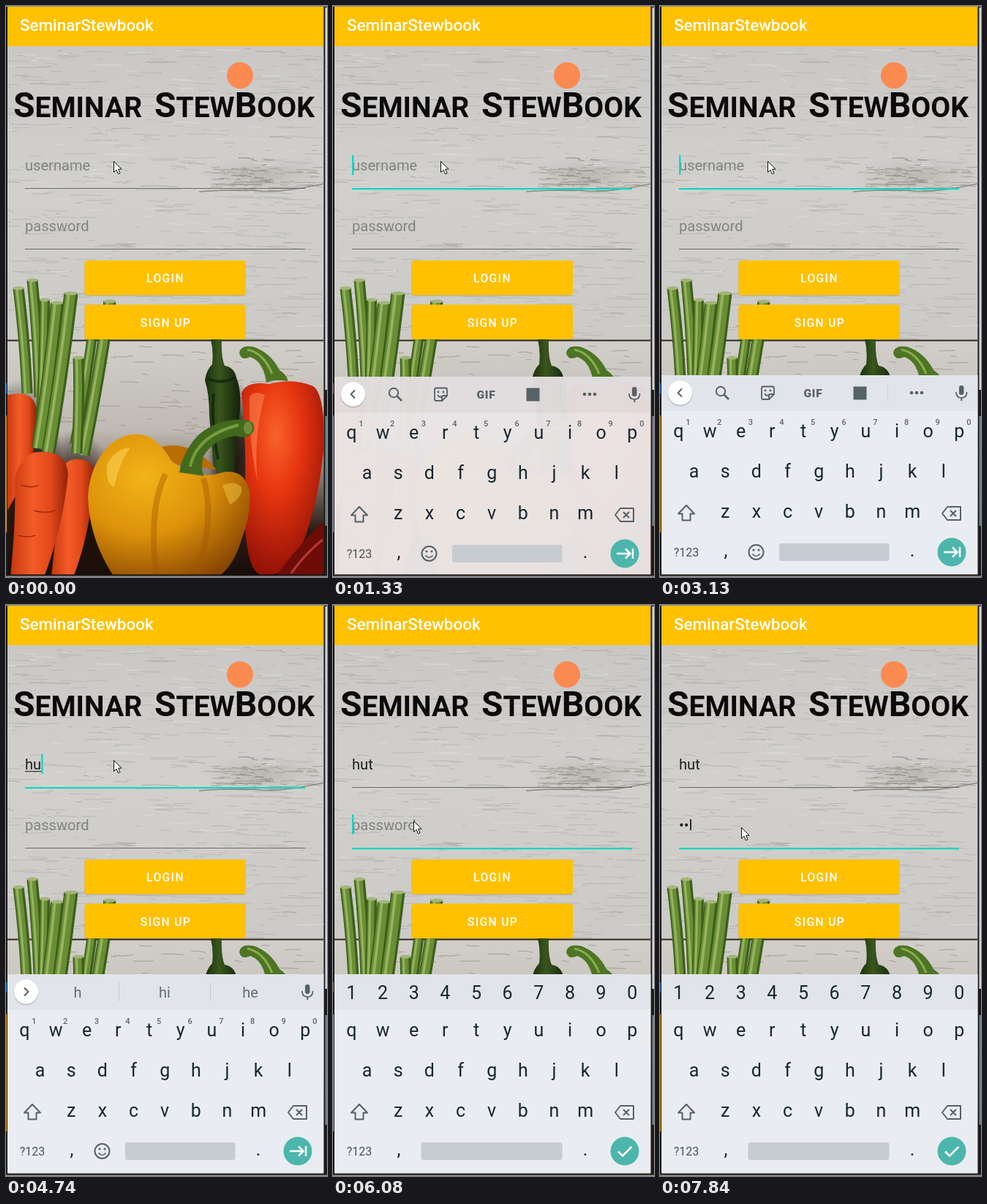
Recreate the animation shown at these times as an HTML page. Size 439 by 781 pixels, loop 7.99 s.

```html
<!DOCTYPE html>
<html lang="en">
<head>
<meta charset="utf-8">
<title>SeminarStewbook</title>
<style>
  html, body { margin: 0; width: 100%; height: 100%; overflow: hidden; background: #1c1c1c; }
  svg { display: block; width: 439px; height: 781px; }
  text { font-family: Roboto, "Open Sans", sans-serif; white-space: pre; }
  .title { font-size: 22.4px; font-weight: 500; fill: #fff; }
  .brand { font-size: 48px; font-weight: 700; fill: #0c0a0a; }
  .brand tspan { font-size: 39px; }
  .input { font-size: 20.1px; fill: #20211f; }
  .hint { font-size: 20.1px; fill: #83847d; }
  .btn { fill: #ffc100; }
  .label { font-size: 15.6px; font-weight: 500; letter-spacing: 1.4px; fill: #fff; text-anchor: middle; }
  .key { font-size: 25px; fill: #17272e; text-anchor: middle; }
  .tiny { font-size: 11px; font-weight: 500; fill: #5b666c; text-anchor: middle; }
  .word { font-size: 20px; fill: #626c72; text-anchor: middle; }
  .mode { font-size: 16px; fill: #475259; text-anchor: middle; }
  .icon { fill: none; stroke: #566168; stroke-width: 2; stroke-linejoin: round; }
  .solid { fill: #566168; stroke: none; }
</style>
</head>
<body>
<svg viewBox="0 0 439 781">
  <defs>
    <linearGradient id="wood" x2="0" y2="1">
      <stop offset="0" stop-color="#c9c8c6"/><stop offset=".45" stop-color="#d1d0cd"/>
      <stop offset="1" stop-color="#cbcac7"/>
    </linearGradient>
    <linearGradient id="plank" x2="0" y2="1">
      <stop offset="0" stop-color="#d2cfca"/><stop offset=".38" stop-color="#bfbab3"/>
      <stop offset=".6" stop-color="#7d7268"/><stop offset=".8" stop-color="#2c1c14"/>
      <stop offset="1" stop-color="#150c08"/>
    </linearGradient>
    <linearGradient id="carrot">
      <stop offset="0" stop-color="#c93810"/><stop offset=".4" stop-color="#f25c28"/>
      <stop offset=".7" stop-color="#e2481a"/><stop offset="1" stop-color="#8f2208"/>
    </linearGradient>
    <radialGradient id="red" cx=".42" cy=".28" r=".75">
      <stop offset="0" stop-color="#f8642a"/><stop offset=".4" stop-color="#e73510"/>
      <stop offset="1" stop-color="#8e1006"/>
    </radialGradient>
    <radialGradient id="yellow" cx=".35" cy=".3" r=".8">
      <stop offset="0" stop-color="#f2b418"/><stop offset=".5" stop-color="#dd920a"/>
      <stop offset="1" stop-color="#874503"/>
    </radialGradient>
    <linearGradient id="chilli">
      <stop offset="0" stop-color="#1a2d0c"/><stop offset=".4" stop-color="#3a561d"/>
      <stop offset="1" stop-color="#13210a"/>
    </linearGradient>
    <radialGradient id="knot">
      <stop offset="0" stop-color="#b0ada4" stop-opacity=".7"/><stop offset="1" stop-color="#bcb9b0" stop-opacity="0"/>
    </radialGradient>
    <radialGradient id="shade">
      <stop offset="0" stop-color="#1c0f08" stop-opacity=".95"/><stop offset=".5" stop-color="#1c0f08" stop-opacity=".8"/>
      <stop offset="1" stop-color="#1c0f08" stop-opacity="0"/>
    </radialGradient>
    <clipPath id="screen"><rect x="2" y="1" width="432.500" height="778"/></clipPath>
  </defs>

  <!-- window edges -->
  <rect width="439" height="781" fill="#1c1c1c"/>
  <path d="M436.500 2h2.500v523h-2.500z" fill="#d3d6da"/>
  <path d="M436.500 561h2.500v150h-2.500z" fill="#71808c"/>
  <path d="M0 560h1v160h-1z" fill="#e39a1c"/>
  <path d="M0 516h1v14h-1z" fill="#2a7fd0"/>
  <path d="M0 0h439v1H0z" fill="#8b8b83"/>

  <g clip-path="url(#screen)">
    <rect x="2" y="55" width="433" height="403" fill="url(#wood)"/>
    <rect x="2" y="457" width="433" height="324" fill="url(#plank)"/>
    <ellipse cx="352" cy="230" rx="92" ry="26" fill="url(#knot)"/>
    <g id="grain" fill="none"></g>
    <path d="M264 254Q318 250 346 253T435 243" stroke="#8d8a82" stroke-width="1.500" fill="none"/>
    <path d="M2 457.500H435" stroke="#33291f" stroke-width="2.200"/>
    <ellipse cx="312" cy="620" rx="36" ry="110" fill="url(#shade)"/>
    <ellipse cx="96" cy="700" rx="60" ry="120" fill="url(#shade)"/>
    <ellipse cx="20" cy="640" rx="60" ry="130" fill="url(#shade)"/>

    <!-- vegetables -->
    <path d="M2 532Q38 524 42 552Q44 590 30 640L2 690z" fill="url(#carrot)"/>
    <path d="M62 781Q72 690 74 640Q80 618 100 620Q122 622 121 640Q116 720 92 781z" fill="url(#carrot)"/>
    <path d="M280 456H295Q294 480 299 492Q312 494 315 508Q324 530 318 570L312 640Q300 652 284 632L278 560Q278 530 272 512Q274 498 282 490Q284 472 280 456z" fill="url(#chilli)"/>
    <path d="M276 510Q296 518 314 508M284 530Q280 570 290 620" stroke="#10200a" stroke-width="4" fill="none" opacity=".7"/>
    <path d="M322 530Q328 512 360 517Q392 508 420 520Q436 530 435 600Q428 680 404 740Q386 782 350 778Q328 776 326 690Q330 600 322 530z" fill="url(#red)"/>
    <path d="M333 534Q341 525 354 532Q338 590 344 650Q332 600 333 534z" fill="#ff9b62" opacity=".45"/>
    <path d="M319 475Q320 463 338 466Q362 474 374 498Q386 506 385 513Q368 510 356 515Q352 486 334 480Q322 486 319 475z" fill="#4d7524"/>
    <path d="M330 470Q352 474 364 503" stroke="#8aac4e" stroke-width="3" fill="none"/>
    <path d="M368 781Q396 742 435 704V781z" fill="#6e0c08"/>
    <path d="M390 776Q410 748 433 730" stroke="#b53a30" stroke-width="3" fill="none"/>
    <path d="M192 622Q200 600 232 601Q262 604 288 634z" fill="#b96d05"/>
    <path d="M112 672Q114 628 142 600Q166 580 192 588Q212 596 226 622Q262 650 296 638Q326 632 333 664Q336 694 322 730Q312 765 290 781H148Q114 730 112 672z" fill="url(#yellow)"/>
    <path d="M218 640Q194 690 206 781M270 646Q286 700 262 775" stroke="#9c5503" stroke-width="8" fill="none" opacity=".4"/>
    <path d="M138 628Q148 606 170 604Q156 622 148 658Q136 654 138 628z" fill="#ffdc60" opacity=".5"/>
    <path d="M296 656Q312 648 322 658Q324 672 306 682z" fill="#ffd653" opacity=".4"/>
    <path d="M237 638Q242 608 264 586Q290 564 328 566Q341 568 339 580Q334 594 314 588Q284 592 270 616Q266 630 270 643Q254 640 237 638z" fill="#43691c"/>
    <path d="M252 630Q260 588 318 573" stroke="#7a9c3e" stroke-width="4" fill="none"/>
    <ellipse cx="331" cy="577" rx="6" ry="9" fill="#6b8d37"/>
    <g id="stems"></g>
    <path d="M12 648Q20 608 48 610Q82 608 85 640Q78 712 52 781H6Q14 700 12 648z" fill="url(#carrot)"/>
    <path d="M20 655q14 5 24 1M38 690q16 5 30 0M16 724q14 4 24 0" stroke="#a92a0c" stroke-width="1.500" fill="none"/>

    <!-- header and form -->
    <rect x="2" y="1" width="433" height="54" fill="#ffc100"/>
    <text class="title" x="19" y="34">SeminarStewbook</text>
    <circle cx="320" cy="95" r="18" fill="#fb8a50"/>
    <text class="brand" x="10" y="152">S<tspan>EMINAR</tspan></text>
    <text class="brand" x="203" y="152">S<tspan>TEW</tspan>B<tspan>OOK</tspan></text>

    <g id="fields"></g>
    <g fill="#000" opacity=".1">
      <rect x="107" y="349" width="221" height="48" rx="4"/><rect x="107" y="409.500" width="221" height="48" rx="4"/>
    </g>
    <rect class="btn" x="107.500" y="348" width="220.500" height="47.500" rx="3.500"/>
    <rect class="btn" x="107.500" y="408.500" width="220.500" height="47.500" rx="3.500"/>
    <text class="label" x="218" y="378">LOGIN</text>
    <text class="label" x="218.500" y="438.500">SIGN UP</text>

    <!-- keyboard -->
    <g id="board">
      <rect id="panel" x="2" y="505" width="433" height="276"/>
      <rect x="2" y="505" width="433" height="49" opacity=".035"/>
      <g id="letters"></g>
      <g id="numbers"></g>
      <g id="tiny"></g>
      <path class="icon" d="M36 683L47 694.500H41.500V703.500H30.500V694.500H25z"/>
      <path class="icon" d="M393 685H411V703H393L386 694zM397 690l8 8m0-8l-8 8"/>
      <text class="mode" x="36" y="753">?123</text>
      <text class="key" x="90" y="753">,</text>
      <text class="key" x="345" y="753">.</text>
      <rect id="space" y="735" height="24" rx="3" fill="#c7ccd0"/>
      <circle cx="399" cy="747" r="19.500" fill="#4db6ac"/>
      <g fill="none" stroke="#fff" stroke-width="2.500">
        <path id="next" d="M388 747H406M400 740.500L406.500 747L400 753.500M410 740V754"/>
        <path id="done" d="M390 747.500L396 753.500L408.500 741"/>
      </g>
      <g id="smile">
        <circle class="icon" cx="131.500" cy="747" r="10"/>
        <circle class="solid" cx="128" cy="744" r="1.600"/><circle class="solid" cx="135" cy="744" r="1.600"/>
        <path class="icon" d="M126.500 749.500q5 6 10 0" style="stroke-width:1.700"/>
      </g>
      <g id="strip">
        <circle cx="27.500" cy="530.500" r="17" fill="#000" opacity=".15"/>
        <circle cx="27.500" cy="529" r="16.500" fill="#fff"/>
        <path id="chevron" class="icon"/>
        <g class="solid">
          <rect x="409" y="519" width="6.500" height="13" rx="3.200"/>
          <path d="M411.300 536h2v4h-2z"/>
        </g>
        <path class="icon" d="M405 528q0 8 7.300 8t7.300-8" style="stroke-width:1.700"/>
      </g>
      <g id="tools">
        <circle class="icon" cx="83" cy="527" r="6.200"/><path class="icon" d="M87.500 531.500L94 538" style="stroke-width:2.600"/>
        <path class="icon" d="M141 520.500H154Q156 520.500 156 523V531L149 538H141Q139 538 139 536V523Q139 520.500 141 520.500zM156 531H151Q149 531 149 533V538M143 530q3 5 7 1" style="stroke-width:1.800"/>
        <circle class="solid" cx="144" cy="526" r="1.400"/><circle class="solid" cx="151" cy="526" r="1.400"/>
        <text x="209.500" y="534.500" text-anchor="middle" font-size="15.500" font-weight="900" letter-spacing=".8" fill="#566168">GIF</text>
        <rect class="solid" x="264.500" y="520.500" width="18" height="18"/>
        <path d="M311.500 516V541" stroke="#cdd2d5"/>
        <g class="solid"><circle cx="344" cy="529" r="2.300"/><circle cx="351" cy="529" r="2.300"/><circle cx="358" cy="529" r="2.300"/></g>
      </g>
      <g id="words">
        <path d="M154.500 516V542M279.500 516V542" stroke="#c6cbcf"/>
        <text class="word" x="98" y="537"></text>
        <text class="word" x="217" y="537"></text>
        <text class="word" x="334" y="537"></text>
      </g>
    </g>
    <path id="mouse" d="M.5.5V15.500L4 12.200L6.500 17.800L9 16.700L6.600 11.200H11z" fill="#fff" stroke="#111"/>
  </g>
  <path d="M0 778.500H436" stroke="#17120f" stroke-width="2"/>
  <path d="M0 780.300H439" stroke="#8f8f8b" stroke-width="1.400"/>
</svg>
<script>
const LOOP = 7990;
const TEAL = '#12d6c4';
const $ = id => document.getElementById(id);

function add(parent, tag, attrs, text = '') {
  const el = document.createElementNS('http://www.w3.org/2000/svg', tag);
  for (const k in attrs) el.setAttribute(k, attrs[k]);
  el.textContent = text;
  parent.append(el);
  return el;
}
const show = (el, on) => { el.style.display = on ? '' : 'none'; };

let seed = 7;
const rnd = () => (seed = seed * 16807 % 2147483647) / 2147483647;

function grain(count, color, width, top, bottom, left = -15, right = 425, max = 60) {
  let d = '';
  for (let i = 0; i < count; i++) {
    const x = left + rnd() * (right - left), y = top + rnd() * (bottom - top), len = 6 + rnd() * rnd() * max;
    d += `M${x.toFixed(1)} ${y.toFixed(1)}q${(len / 2).toFixed(1)} ${(rnd() * 4 - 2).toFixed(1)} ${len.toFixed(1)} ${(rnd() * 3 - 1).toFixed(1)}`;
  }
  add($('grain'), 'path', { d, stroke: color, 'stroke-width': width });
}
grain(420, '#b9b8b4', 1, 58, 455);
grain(90, '#d8d7d5', 1.4, 58, 455);
grain(40, '#a19f9a', .8, 58, 455);
grain(90, '#a39d95', 1, 462, 620);
// the knot
grain(45, '#a3a098', 1, 220, 252, 280, 425, 40);
grain(25, '#99968d', 1.2, 208, 246, 305, 365, 25);

// x, y of the cut end, x, y of the root, width
const stems = [
  [17, 386, 29, 530, 15], [36, 375, 46, 535, 15], [53, 402, 46, 590, 14],
  [70, 406, 44, 605, 18], [89, 393, 58, 610, 19], [122, 420, 94, 600, 14],
  [142, 404, 106, 614, 17], [99, 481, 97, 612, 15]
];
for (const [x, y, x2, y2, w] of stems) {
  const d = `M${x} ${y}Q${(x + x2) / 2 + 3} ${(y + y2) / 2} ${x2} ${y2}`;
  const line = (stroke, width, shift) => add($('stems'), 'path', {
    d, stroke, fill: 'none', 'stroke-width': width, transform: `translate(${shift} 0)`
  });
  line('#3c5f1b', w, 0);
  line('#688f35', w - 5, -.8);
  line('#98b35f', w / 5, -w / 6);
  add($('stems'), 'ellipse', { cx: x, cy: y, rx: w / 2, ry: 2.4, fill: '#a3b579' });
}

function row(parent, chars, x, y, cls = 'key') {
  [...chars].forEach((c, i) => add($(parent), 'text', { class: cls, x: x + i * 42.65, y }, c));
}
row('letters', 'qwertyuiop', 25.4, 590);
row('letters', 'asdfghjkl', 46.6, 645);
row('letters', 'zxcvbnm', 89.2, 700);
row('numbers', '1234567890', 25.4, 539);
row('tiny', '1234567890', 38.5, 572.5, 'tiny');

function makeField(hint, y) {
  const g = $('fields');
  const hintEl = add(g, 'text', { class: 'hint', x: 26, y }, hint);
  const text = add(g, 'text', { class: 'input', x: 26, y });
  const mark = add(g, 'rect', { x: 26, y: y + 2, height: 1.2, fill: '#333' });
  const line = add(g, 'rect', { x: 26, width: 383, y: Math.round(y + 24) });
  const caret = add(g, 'rect', { y: y - 21, width: 2.4, height: 27, fill: TEAL });
  return (value, focus, blink, composing) => {
    text.textContent = value;
    show(hintEl, !value);
    const w = value ? text.getComputedTextLength() : 0;
    mark.setAttribute('width', composing ? w : 0);
    caret.setAttribute('x', 26 + w);
    show(caret, focus && blink);
    line.setAttribute('height', focus ? 2.2 : 1);
    line.setAttribute('fill', focus ? TEAL : '#6c6c68');
  };
}
const userField = makeField('username', 225);
const passField = makeField('password', 307.5);

const start = {
  user: '', pass: '', focus: '', blink: true, board: '', rise: 0, words: null, composing: false, mouse: [147, 212]
};
// each entry changes the state from its time on
const steps = [
  [970, { focus: 'user' }],
  [1330, { board: 'text', rise: 2 }],
  [1450, { rise: 0 }],
  [1730, { blink: false }], [2160, { blink: true }],
  [2690, { blink: false }], [3130, { blink: true }],
  [3720, { blink: false }], [4250, { blink: true }],
  [4620, { user: 'h', composing: true, words: ['h', 'hi', 'he'] }],
  [4740, { user: 'hu' }],
  [4860, { words: ['hu', 'hut', 'hub'] }],
  [5000, { user: 'hut', words: ['hut', 'huts', 'hunt'] }],
  [5420, { blink: false }],
  [5570, { mouse: [147, 216] }],
  [5720, { mouse: [128, 262] }],
  [5840, { mouse: [110, 295] }],
  [5960, { focus: 'pass', blink: true, composing: false }],
  [6080, { board: 'secret' }],
  [6480, { blink: false }],
  [6910, { pass: 'k', blink: true }],
  [7030, { pass: '•o' }],
  [7310, { pass: '••l' }],
  [7840, { blink: false, mouse: [111, 304] }]
];

function draw(s) {
  userField(s.user, s.focus === 'user', s.blink, s.composing);
  passField(s.pass, s.focus === 'pass', s.blink, false);
  const secret = s.board === 'secret';
  show($('board'), s.board);
  $('board').setAttribute('transform', `translate(0 ${s.rise})`);
  $('panel').setAttribute('fill', s.rise ? '#ebe7e8' : '#e9edf1');
  $('panel').setAttribute('opacity', s.rise ? .97 : 1);
  for (const id of ['numbers', 'done']) show($(id), secret);
  for (const id of ['tiny', 'next', 'smile', 'strip']) show($(id), !secret);
  show($('tools'), !secret && !s.words);
  show($('words'), !secret && s.words);
  $('words').querySelectorAll('text').forEach((t, i) => { t.textContent = s.words ? s.words[i] : ''; });
  $('chevron').setAttribute('d', s.words ? 'M25 523.5L30.5 529L25 534.5' : 'M30 523.5L24.5 529L30 534.5');
  $('space').setAttribute('x', secret ? 120.5 : 163);
  $('space').setAttribute('width', secret ? 193 : 150.5);
  $('mouse').setAttribute('transform', `translate(${s.mouse})`);
}

let last = -1;
const t0 = performance.now();
function tick() {
  const t = (performance.now() - t0) % LOOP;
  const active = steps.filter(([at]) => at <= t);
  if (active.length !== last) {
    last = active.length;
    draw(Object.assign({}, start, ...active.map(([, change]) => change)));
  }
  requestAnimationFrame(tick);
}
tick();
</script>
</body>
</html>
```
